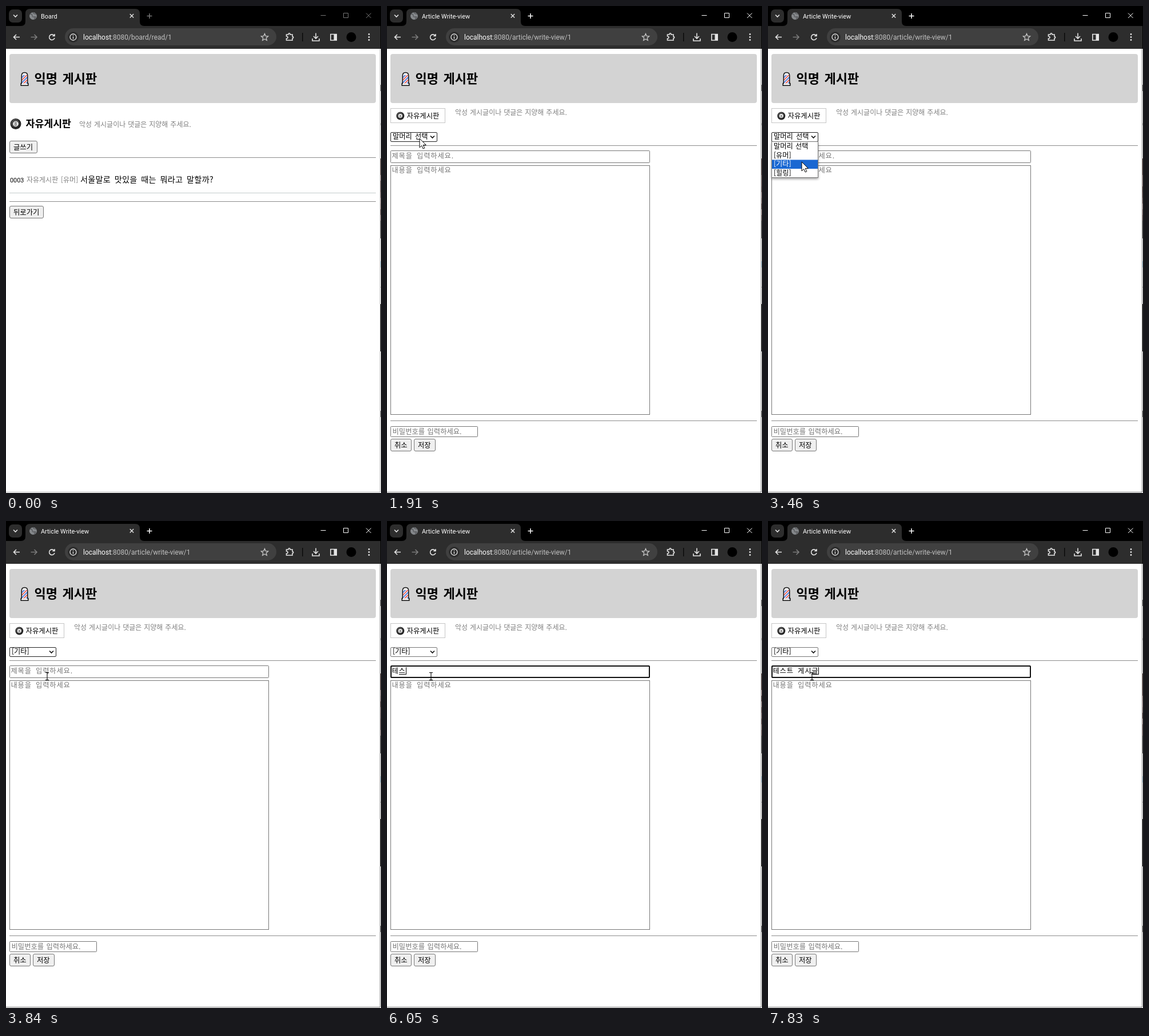
An HTML page for the animation above (8 s loop, 656x853 px).

```html
<!DOCTYPE html>
<html lang="ko">
<head>
<meta charset="utf-8">
<title>Board</title>
<style>
  html, body { margin: 0; width: 100%; height: 100%; overflow: hidden; background: #fff; }
  svg { display: block; }
  text { font-family: "Noto Sans CJK KR", "Noto Sans CJK", sans-serif; font-weight: 350; white-space: pre; }
  .bold { font-weight: 700; }
  .ui { font-family: Roboto, sans-serif; font-weight: 400; }
</style>
</head>
<body>
<svg id="stage" width="656" height="853" viewBox="0 0 656 853" xmlns="http://www.w3.org/2000/svg"></svg>
<script>
const LOOP = 8000, TICK = 96.3, GRAY = '#808080', HINT = '#757575';

const rect = (x, y, w, h, fill, extra = '') =>
  `<rect x="${x}" y="${y}" width="${w}" height="${h}" fill="${fill}" ${extra}/>`;
const frame = (x, y, w, h, fill, stroke, r = 0, id = '') =>
  rect(x + .5, y + .5, w - 1, h - 1, fill, `stroke="${stroke}" rx="${r}" ${id && `id="${id}"`}`);
const label = (x, y, s, size = 12.2, fill = '#000', extra = '') =>
  `<text x="${x}" y="${y}" font-size="${size}" fill="${fill}" ${extra}>${s}</text>`;
const line = (d, color = '#e4e4e4', w = 1.6, extra = '') =>
  `<path d="${d}" fill="none" stroke="${color}" stroke-width="${w}" ${extra}/>`;
const rule = (y, color = '#8c8c8c') => rect(6, y, 641, 1, color);
const spaced = n => `word-spacing="${n}"`;
const mono = 'letter-spacing=".8" word-spacing="3"';
const button = (x, y, w, s, id) =>
  frame(x, y, w, 22, '#efefef', '#767676', 2.5, id) + label(x + 7, y + 16, s, 12.3);

const eightBall = (x, y, r) => `<g transform="translate(${x} ${y}) scale(${r / 9.5})">
  <circle r="9.5" fill="#262626"/><circle cx="-1" cy="-1.5" r="7.2" fill="#4a4a4a"/>
  <circle r="4.7" fill="#f2f2f2"/>
  <text class="ui" y="3.1" font-size="8.5" text-anchor="middle" fill="#222">8</text></g>`;

const barberPole = `<clipPath id="pole"><rect x="28" y="121" width="9" height="14.5"/></clipPath>
  <path d="M27.3 135.5V122Q27.3 116.6 32.5 116.6T37.7 122V135.5H38.8V139.3H26.2V135.5Z" fill="#f4f4f4" stroke="#111" stroke-width="1.5"/>
  <g clip-path="url(#pole)">${[0, 1, 2, 3, 4].map(i =>
    line(`M26 ${127 + i * 4.5}L40 ${113 + i * 4.5}`, i % 2 ? '#e8605a' : '#4a7ce0', 1.9)).join('')}</g>`;

function browser() {
  const globe = `<circle cx="47.5" cy="17.5" r="6.5" fill="#85888b"/>` +
    line('M42 14Q46 14 46 17T50 19T49 23M47 11Q48 14 53 14', '#55575a', 1.3);
  return rect(0, 0, 655, 35, '#000') + rect(0, 35, 655, 40, '#2d2d2d') +
    rect(5, 6, 23, 23, '#2d2d2d', 'rx="7"') + line('M13 15.5L16.5 19L20 15.5') +
    `<path d="M26 35Q34 35 34 27V13Q34 5 42 5H226Q234 5 234 13V27Q234 35 242 35Z" fill="#2d2d2d"/>` + globe +
    `<text id="tab" class="ui" x="61" y="22" font-size="10.9" fill="#fff"></text>` +
    line('M216.8 14L223.2 20.4M223.2 14L216.8 20.4', '#e4e4e4', 1.4) +
    `<g id="controls" fill="none" stroke="#fff">
      <path d="M246.5 17.5H255.5M251 13V22" stroke-width="1.5"/>
      <path d="M550.5 16.5H559.5M590.5 12.5H598.5V20.5H590.5ZM630 12.5L638.5 21M638.5 12.5L630 21"/></g>` +
    line('M24 54.5H13.5M18 50L13.5 54.5L18 59') +
    line('M43.5 54.5H54M49.5 50L54 54.5L49.5 59', '#7c7c7c') +
    line('M84 51.5A4.8 4.8 0 1 0 85 56M85 49V52.5H81.3') +
    rect(103, 39, 370, 30, '#404040', 'rx="15"') +
    `<circle cx="117.5" cy="54.5" r="9.5" fill="#2d2d2d"/>` +
    `<circle cx="117.5" cy="54.5" r="5.5" fill="none" stroke="#e4e4e4" stroke-width="1.3"/>` +
    line('M117.5 54V57.5M117.5 51.3V52.7', '#e4e4e4', 1.4) +
    `<text class="ui" x="135" y="59" font-size="12" fill="#c0c0c0"><tspan fill="#fff">localhost</tspan><tspan id="path"></tspan></text>` +
    line('M452.5 48.5L454.2 52.6L458.6 53L455.2 55.9L456.3 60.2L452.5 57.9L448.7 60.2L449.8 55.9L446.4 53L450.8 52.6Z', '#c8c8c8', 1.3) +
    line('M490.5 50H494Q494 47.8 495.5 47.8T497 50H501V53.5Q502.7 53.5 502.7 55T501 56.5V60H490.5V57Q493 57 493 55T490.5 53Z') +
    rect(518, 47, 1.5, 15, '#0a0a0a') +
    line('M542 47.5V56.5M538 53L542 57L546 53M536 57V61H548V57') +
    line('M567.8 49.5H578.2V60H567.8Z') + rect(573.5, 49, 5, 11, '#e4e4e4') +
    '<circle cx="604" cy="54.5" r="8.5" fill="#000"/>' +
    [49.5, 54.5, 59.5].map(y => `<circle cx="635" cy="${y}" r="1.4" fill="#e4e4e4"/>`).join('');
}

const notice = '악성 게시글이나 댓글은 지양해 주세요.';

const header = rect(6, 84, 641, 86, '#d3d3d3', 'rx="4"') + barberPole +
  label(49.5, 135, '익명 게시판', 22, '#000', 'class="bold" word-spacing="2.4"');

const listPage = eightBall(17, 206.5, 9.5) +
  label(34.5, 211.5, '자유게시판', 17.3, '#000', 'class="bold"') +
  label(128, 212, notice, 12, GRAY, spaced(.6)) +
  button(6, 236, 49, '글쓰기', 'write') + rule(265) +
  `<text class="ui" x="7" y="309" font-size="10.8">0003</text>` +
  label(36, 309, '자유게시판', 12, GRAY) + label(96, 309, '[유머]', 12, GRAY) +
  label(130, 309, '서울말로 맛있을 때는 뭐라고 말할까?', 14.2, '#000', 'letter-spacing=".2" word-spacing="2.6"') +
  rule(327, '#c4cbcb') + rule(342) + button(6, 350, 60, '뒤로가기');

const options = ['말머리 선택', '[유머]', '[기타]', '[힐링]'];
const ROW = 15.7, MENU_TOP = 238;

const writePage = frame(6, 179, 96, 26, '#fff', '#c6c6c6') + eightBall(23.3, 192.5, 7) +
  label(34.5, 197, '자유게시판', 12.4) + label(119, 190.5, notice, 12, GRAY, spaced(.6)) +
  frame(6, 221, 82, 17, '#fff', '#767676', 1.5, 'select') +
  `<text id="choice" x="10" y="233" font-size="12.2" word-spacing="2"></text>` +
  line('M76 227.5L79.5 231L83 227.5', '#111', 1.7) + rule(244) +
  frame(6, 253, 454, 22, '#fff', '#767676', 1) +
  rect(7, 254, 452, 20, '#fff', 'id="focus" stroke="#101010" stroke-width="2" rx="1.5"') +
  `<text id="title" x="8.5" y="266.5" font-size="12.3" ${mono}></text>` +
  rect(0, 268, 12, 1, '#000', 'id="compose"') + rect(0, 256, 1, 13, '#000', 'id="caret"') +
  frame(6, 279, 454, 437, '#fff', '#767676') +
  label(8.5, 292, '내용을 입력하세요', 12.3, HINT, mono) + rule(726) +
  frame(6, 736, 153, 19, '#fff', '#767676', 1) +
  label(9.5, 749.5, '비밀번호를 입력하세요.', 12.3, HINT, spaced(1)) +
  button(6, 758, 37, '취소') + button(47, 758, 38, '저장') +
  `<g id="menu"><rect x="6" y="238" width="82" height="63" filter="url(#shade)"/>` +
  frame(6, 237, 82, 64, '#fff', '#767676') + rect(7, 0, 80, ROW, '#1967d2', 'id="mark"') +
  options.map((s, i) => label(10, 250 + i * ROW, s, 12.2, '#000', spaced(1))).join('') + '</g>';

const pointer = `<path id="arrow" d="M0 0V16L3.7 12.5L6.2 18L8.8 16.8L6.3 11.5H11.3Z" fill="#fff" stroke="#000" stroke-width="1"/>` +
  `<path id="beam" d="M-3 -6.5H-.8L0 -5.7L.8 -6.5H3M0 -5.7V5.7M-3 6.5H-.8L0 5.7L.8 6.5H3" fill="none" stroke="#000" stroke-width="1.1"/>`;

// Sliver of the desktop beside the window: [top, height, colour]
const sliver = [[0, 75, '#000'], [138, 11, '#777'], [205, 4, '#ccc'], [267, 62, '#5a4846'], [345, 62, '#5b5b5b'],
  [447, 11, '#bfe0f2'], [492, 1, '#aaa'], [522, 83, '#111'], [709, 11, '#777']];

const stage = document.getElementById('stage');
stage.innerHTML = `<defs><filter id="shade" x="-20%" y="-20%" width="140%" height="150%">
    <feGaussianBlur stdDeviation="2"/><feOffset dy="2"/>
    <feComponentTransfer><feFuncA type="linear" slope=".4"/></feComponentTransfer></filter></defs>` +
  rect(0, 0, 656, 853, '#fff') + browser() + header +
  `<g id="list">${listPage}</g><g id="form">${writePage}</g>` +
  rect(654, 75, 1, 777, '#9a9a9a', 'id="edge"') + rect(0, 851, 655, 1, '#9a9a9a', 'id="base"') +
  sliver.map(([y, h, c]) => rect(655, y, 1, h, c)).join('') +
  '<g id="flicker"></g>' + `<g id="cursor">${pointer}</g>`;

const $ = id => document.getElementById(id);
const set = (id, name, value) => $(id).setAttribute(name, value);
const show = (id, on) => set(id, 'display', on ? 'inline' : 'none');
const put = (id, s) => { if ($(id).textContent !== s) $(id).textContent = s; };
const optionTexts = [...$('menu').querySelectorAll('text')];

// [time, x, y]
const path = [[480, 640, 420], [770, 330, 300], [1050, 60, 255], [1150, 43, 245], [1340, 43, 245],
  [1630, 54, 240], [1780, 54, 240], [1900, 57, 232], [2700, 57, 232], [2970, 59, 273],
  [3650, 59, 273], [3940, 77, 272]];

const typed = [[5190, 'ㅌ'], [5380, '테'], [5760, '텟'], [5950, '테스'], [6150, '테슽'], [6250, '테스트'],
  [6340, '테스트 '], [6530, '테스트 ㄱ'], [6630, '테스트 게'], [6820, '테스트 겟'], [6920, '테스트 게시'],
  [7070, '테스트 게식'], [7270, '테스트 게시그'], [7460, '테스트 게시글']];

function place(t) {
  const i = path.findIndex(k => k[0] > t);
  if (i < 0) return path[path.length - 1].slice(1);
  if (i === 0) return path[0].slice(1);
  const [a, x, y] = path[i - 1], [b, u, v] = path[i], k = (t - a) / (b - a);
  return [Math.round(x + (u - x) * k), Math.round(y + (v - y) * k)];
}

const noise = n => { const v = Math.sin(n * 91.7) * 4375.5; return v - Math.floor(v); };

function draw(t) {
  const tick = Math.floor((t + 25) / TICK);
  const [x, y] = place(tick * TICK);
  const active = t >= 1150, form = t >= 1440, open = t >= 2100 && t < 3560;

  set('controls', 'stroke', active ? '#fff' : '#777');
  set('edge', 'fill', active ? '#777' : '#aaa');
  set('base', 'fill', active ? '#777' : '#aaa');
  put('tab', form ? 'Article Write-view' : 'Board');
  put('path', form ? ':8080/article/write-view/1' : ':8080/board/read/1');
  show('list', !form);
  show('form', form);
  set('write', 'fill', active && !form ? '#fafafa' : '#efefef');

  set('select', 'stroke', t >= 1820 && t < 4030 ? '#222' : '#767676');
  put('choice', options[t < 3560 ? 0 : 2]);
  show('menu', open);
  const row = Math.max(0, Math.min(3, Math.floor((y - MENU_TOP) / ROW)));
  set('mark', 'y', MENU_TOP + row * ROW);
  optionTexts.forEach((el, i) => el.setAttribute('fill', i === row ? '#fff' : '#000'));

  const key = typed.filter(k => k[0] <= t).pop();
  const value = key ? key[1] : '';
  put('title', value || '제목을 입력하세요.');
  set('title', 'fill', value ? '#000' : HINT);
  show('focus', t >= 4030);
  const end = 9 + [...value].reduce((w, c) => w + (c === ' ' ? 6.5 : 12.1), 0);
  const since = t - (key ? key[0] : 4030);
  show('caret', t >= 4030 && since % 1000 < 500);
  set('caret', 'x', Math.round(end));
  show('compose', value && !value.endsWith(' '));
  set('compose', 'x', Math.round(end - 12.1));

  show('cursor', t >= 480);
  set('cursor', 'transform', `translate(${x} ${y})`);
  show('arrow', t < 3560);
  show('beam', t >= 3560);

  const beat = Math.floor((t + 85) / 193);
  $('flicker').innerHTML = Array.from({ length: 8 }, (_, i) => {
    const v = Math.round(60 + noise(beat * 8 + i + 1) * 110);
    return rect(655, 296 + i * 10, 1, 10, `rgb(${v + 20},${v},${v})`);
  }).join('');
}

function loop() {
  draw(performance.now() % LOOP);
  requestAnimationFrame(loop);
}
loop();
</script>
</body>
</html>
```
